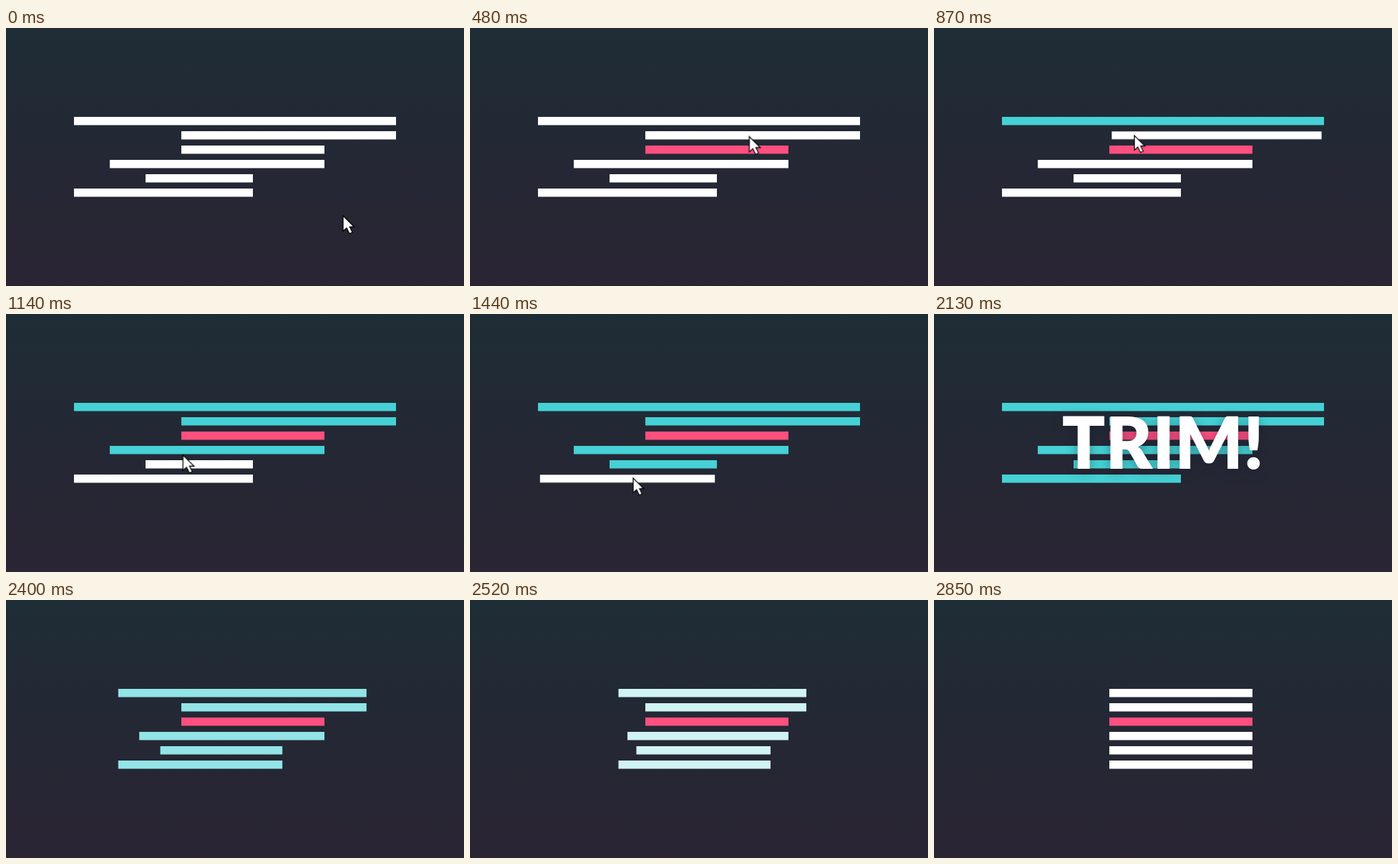
An HTML page for the animation above (3600 ms loop, 640 by 360 pixels).

```html
<!DOCTYPE html>
<html lang="en">
<head>
<meta charset="utf-8">
<title>Trim</title>
<style>
html, body { margin: 0; width: 100%; height: 100%; overflow: hidden; background: #242733; }
svg { display: block; width: 100vw; height: 100vh; }

/* One loop is 3600 ms, so 1% is 36 ms. */
svg * { animation: 3600ms linear infinite; }

.bars {
  --teal: #45d1d5;
  --pink: #ff4f7f;
  --out: cubic-bezier(.333, 1, .667, 1);
}
.bars rect {
  x: var(--x); width: var(--w); height: 11.5px; fill: #fff;
  transform-box: fill-box; transform-origin: center;
  animation-name: press, trim, var(--tint);
  animation-delay: calc(var(--t) - 3660ms), 0s, 0s;
}
@keyframes press {
  0%, 4.2%, 100% { transform: none; animation-timing-function: ease-out; }
  1.67% { transform: scale(.972, .93); animation-timing-function: ease-out; }
}
@keyframes trim {
  0%, 62.5% { x: var(--x); width: var(--w); animation-timing-function: var(--out); }
  79.17%, 100% { x: 245px; width: 200px; }
}
@keyframes tint3 {
  0%, 11.4% { fill: #fff; }
  13%, 100% { fill: var(--pink); }
}
@keyframes tint1 {
  0%, 18.9% { fill: #fff; }
  20.5%, 62.5% { fill: var(--teal); animation-timing-function: var(--out); }
  79.17%, 100% { fill: #fff; }
}
@keyframes tint2 {
  0%, 24.2% { fill: #fff; }
  25.8%, 62.5% { fill: var(--teal); animation-timing-function: var(--out); }
  79.17%, 100% { fill: #fff; }
}
@keyframes tint4 {
  0%, 29.4% { fill: #fff; }
  31%, 62.5% { fill: var(--teal); animation-timing-function: var(--out); }
  79.17%, 100% { fill: #fff; }
}
@keyframes tint5 {
  0%, 34.7% { fill: #fff; }
  36.3%, 62.5% { fill: var(--teal); animation-timing-function: var(--out); }
  79.17%, 100% { fill: #fff; }
}
@keyframes tint6 {
  0%, 40% { fill: #fff; }
  41.6%, 62.5% { fill: var(--teal); animation-timing-function: var(--out); }
  79.17%, 100% { fill: #fff; }
}

/* The pointer's x and y ease separately, which bends its path. */
.px { animation-name: px, leave; }
.py { animation-name: py; }
.tap { animation-name: tap; }
@keyframes px {
  0%, .8% { transform: translateX(471px); animation-timing-function: ease-out; }
  3.8% { transform: translateX(490px); animation-timing-function: ease-in-out; }
  10%, 12% { transform: translateX(404px); animation-timing-function: ease-in-out; }
  16.5%, 19.4% { transform: translateX(332px); animation-timing-function: ease-in-out; }
  23.3%, 24.8% { transform: translateX(280px); animation-timing-function: ease-in-out; }
  28.5%, 30.2% { transform: translateX(252px); animation-timing-function: ease-in-out; }
  33.9%, 35.4% { transform: translateX(238px); animation-timing-function: ease-in-out; }
  39.2%, 100% { transform: translateX(228px); }
}
@keyframes py {
  0%, .8% { transform: translateY(262px); animation-timing-function: ease-in-out; }
  10%, 12% { transform: translateY(170px); animation-timing-function: ease-in-out; }
  15%, 19.4% { transform: translateY(126px); animation-timing-function: ease-in-out; }
  23.3%, 24.8% { transform: translateY(150px); animation-timing-function: ease-in-out; }
  28.5%, 30.2% { transform: translateY(190px); animation-timing-function: ease-in-out; }
  33.9%, 35.4% { transform: translateY(210px); animation-timing-function: ease-in-out; }
  39.2%, 100% { transform: translateY(229px); }
}
@keyframes tap {
  0%, 9.4%, 13.6%, 16.9%, 21.1%, 22.2%, 26.4%, 27.5%, 31.7%, 32.8%, 37%, 38.1%, 42.3%, 100% { transform: none; }
  11.1%, 18.6%, 23.9%, 29.2%, 34.4%, 39.7% { transform: scale(.94); }
}
@keyframes leave {
  0%, 48.2% { visibility: visible; }
  48.21%, 100% { visibility: hidden; }
}

.word { transform-origin: 320px 180px; animation-name: grow, show; filter: drop-shadow(0 3px 8px rgba(15, 20, 40, .4)); }
.word text { font: 900 100px Lato, "Open Sans", sans-serif; fill: #fff; text-anchor: middle; }
@keyframes grow {
  0%, 47.9% { transform: scale(.7); animation-timing-function: ease-out; }
  50.4% { transform: scale(.9); }
  62.9%, 100% { transform: scale(1.04); }
}
@keyframes show {
  0%, 48.2% { visibility: hidden; }
  48.21%, 62.9% { visibility: visible; }
  62.91%, 100% { visibility: hidden; }
}
</style>
</head>
<body>
<svg viewBox="0 0 640 360">
  <defs>
    <linearGradient id="night" x2="0" y2="1">
      <stop stop-color="#1e2d36"/>
      <stop offset=".5" stop-color="#242834"/>
      <stop offset="1" stop-color="#2a2433"/>
    </linearGradient>
  </defs>
  <rect width="640" height="360" fill="url(#night)"/>
  <g class="bars">
    <rect y="124" style="--x:95px; --w:450px; --t:670ms; --tint:tint1"/>
    <rect y="144" style="--x:245px; --w:300px; --t:860ms; --tint:tint2"/>
    <rect y="164" style="--x:245px; --w:200px; --t:400ms; --tint:tint3"/>
    <rect y="184" style="--x:145px; --w:300px; --t:1050ms; --tint:tint4"/>
    <rect y="204" style="--x:195px; --w:150px; --t:1240ms; --tint:tint5"/>
    <rect y="224" style="--x:95px; --w:250px; --t:1430ms; --tint:tint6"/>
  </g>
  <g class="px"><g class="py"><g class="tap">
    <path d="M0 0V21.5L5 17L9 25L13 23L9.3 15.5H15.5Z" fill="#fff" stroke="#000" stroke-width="1.3"/>
  </g></g></g>
  <g class="word"><text x="320" y="216">TRIM!</text></g>
</svg>
</body>
</html>
```
